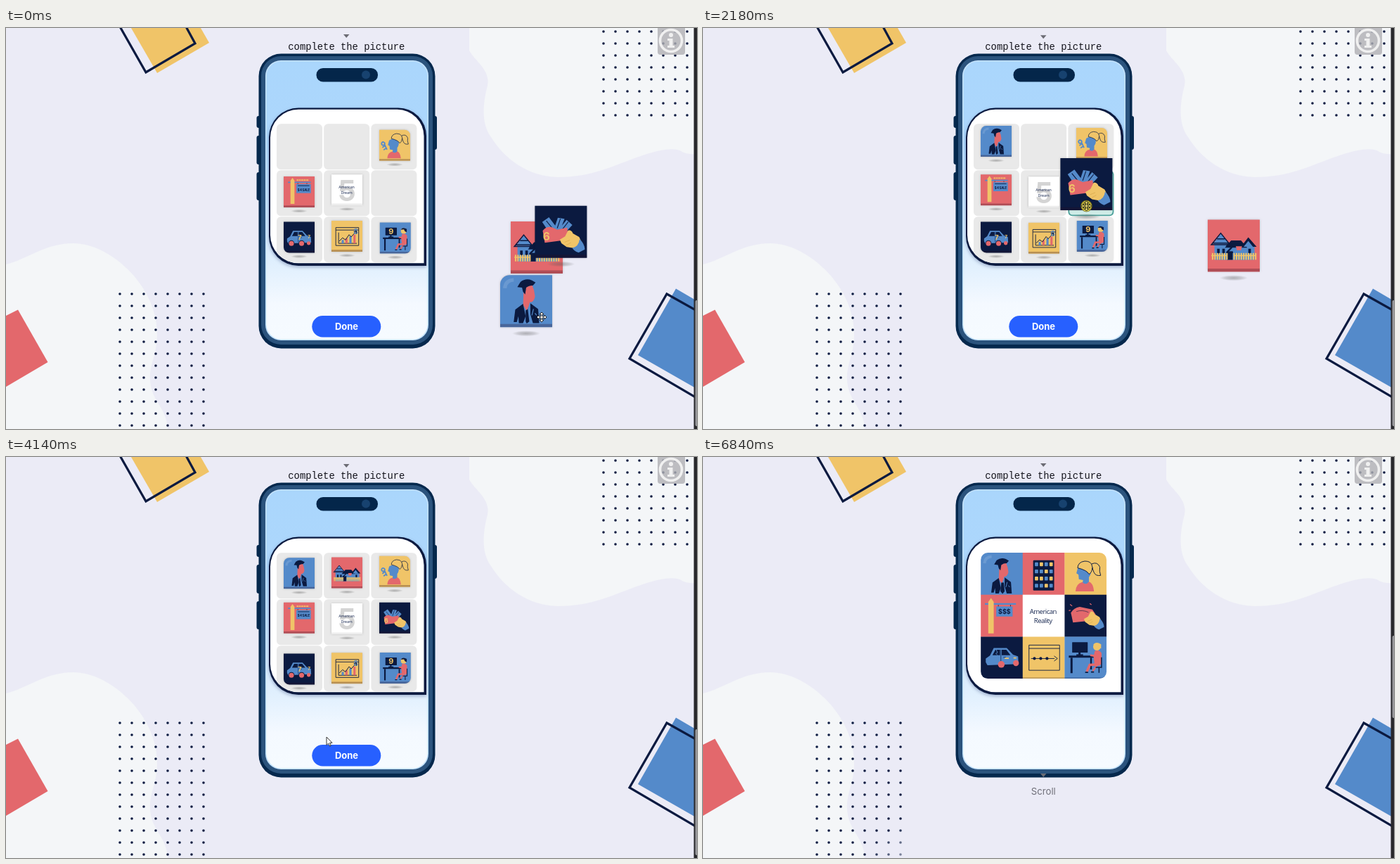
Animation, 983 px wide and 570 px high, one loop 6910 ms. Source, as an HTML page with a canvas:

```html
<!DOCTYPE html>
<html lang="en">
<head>
<meta charset="utf-8">
<title>Complete the picture</title>
<style>
html, body { margin: 0; width: 100%; height: 100%; overflow: hidden; background: #ebebf6; }
canvas { display: block; }
</style>
</head>
<body>
<canvas id="stage" width="983" height="570"></canvas>
<script>
const ctx = document.getElementById('stage').getContext('2d');
const LOOP = 6910;
const NAVY = '#0b1a40', BLUE = '#548aca', RED = '#e3686c', YELLOW = '#f0c468', WHITE = '#fff';

const clamp = v => Math.max(0, Math.min(1, v));
const lerp = (a, b, p) => a + (b - a) * p;
const smooth = p => p * p * (3 - 2 * p);
const ramp = (t, from, to) => clamp((t - from) / (to - from));

function fill(color, d) {
  ctx.fillStyle = color;
  ctx.fill(new Path2D(d));
}
function line(color, width, d) {
  ctx.strokeStyle = color;
  ctx.lineWidth = width;
  ctx.stroke(new Path2D(d));
}
function rect(color, x, y, w, h, r = 0) {
  ctx.beginPath();
  ctx.roundRect(x, y, w, h, r);
  ctx.fillStyle = color;
  ctx.fill();
}
function dot(color, x, y, r) {
  ctx.beginPath();
  ctx.arc(x, y, r, 0, Math.PI * 2);
  ctx.fillStyle = color;
  ctx.fill();
}
function text(str, x, y, font, color, spacing = 0) {
  ctx.font = font;
  ctx.fillStyle = color;
  ctx.textAlign = 'center';
  ctx.letterSpacing = spacing + 'px';
  ctx.fillText(str, x + spacing / 2, y);
  ctx.letterSpacing = '0px';
}
const bold = size => `700 ${size}px Inter, sans-serif`;

// Icons live in a 100 x 100 box; "real" picks the closing picture's version.
const icons = [
  real => {
    ctx.save();
    if (!real) ctx.translate(1, -5);
    fill(RED, 'M46 30L60 23L64 34L66 46Q64 57 56 57L54 64L50 74L43 62L44 38Z');
    fill(NAVY, 'M32 28L38 18Q48 10 60 15L67 19L62 25Q54 25 49 29L47 42L43 37L41 29Z');
    fill(NAVY, 'M25 95L28 71L43 60L48 84L43 97L35 97L34 84L31 95Z');
    fill(NAVY, 'M74 97L72 70L57 59L57 80L62 97Z');
    fill(NAVY, real ? 'M49 71L55 71L57 92L52 98L47 92Z' : 'M48 73L52 70L55 94L50 98L48 94Z');
    line(BLUE, 1.6, 'M63 70L60 82M66 78L69 82');
    ctx.restore();
    line('rgba(255,255,255,.13)', 7, 'M9 25Q10 10 26 9');
  },
  real => {
    if (real) {
      rect(NAVY, 25, 18, 50, 72, 2);
      ['bybY'.toLowerCase(), 'bbyb', 'yyby', 'bbyb'].forEach((row, j) =>
        [...row].forEach((c, i) => rect(c === 'y' ? YELLOW : BLUE, 29 + i * 11.6, 23 + j * 17, 8, 9, 1.5)));
      return;
    }
    rect(BLUE, 13, 47, 27, 30);
    rect(BLUE, 36, 47, 34, 30);
    rect(BLUE, 65, 50, 25, 27);
    fill(BLUE, 'M10 47L25 27L42 47Z');
    line(NAVY, 2, 'M7 48L25 26L43 48ZM10 45L40 45M18 37L33 37');
    fill(NAVY, 'M33 54L45 40L64 40L76 54ZM64 52L78 34L94 52Z');
    fill(BLUE, 'M69 52L78 41L87 52Z');
    fill(RED, 'M54 51L66 51L64 59L56 59Z');
    for (const x of [18, 28, 78]) rect(NAVY, x, 56, 5, 9);
    rect(NAVY, 37, 61, 11, 16);
    for (let x = 8; x < 92; x += 4.6) if (x < 36 || x > 49) rect(YELLOW, x, 64, 2.8, 13, 1);
    rect(YELLOW, 7, 68, 29, 2);
    rect(YELLOW, 50, 68, 42, 2);
    text('2', 42, 64, bold(25), NAVY);
  },
  real => {
    fill(BLUE, 'M32 34L28 49L33 52L34 63L44 65L42 75L58 75L58 58Q66 48 62 34Q46 24 32 34Z');
    const hair = 'M31 36Q32 22 48 20Q60 20 64 27Q78 20 84 34Q82 44 86 54Q74 56 70 47L66 36Q65 48 58 51Q54 42 31 36Z';
    ctx.save();
    if (!real) ctx.translate(8, -8);
    fill(YELLOW, hair);
    line(NAVY, 1.6, hair + 'M64 27L67 37');
    ctx.restore();
    fill(RED, 'M26 92Q27 74 42 70Q50 79 58 69Q68 72 70 92Z');
    if (!real) {
      line(BLUE, 4, 'M17 47a5 5 0 1 1 -9 -5a5 5 0 1 1 9 5L25 64M17 52L10 57M21 60L14 65');
    }
  },
  real => {
    ctx.save();
    if (!real) ctx.translate(4, -3);
    rect(BLUE, 10, 20, 74, 4);
    fill(YELLOW, 'M18 92L18 17L24.5 8L31 17L31 92Z');
    line(NAVY, 1.2, 'M42 24L42 29M71 24L71 29');
    rect(BLUE, 37, 28, real ? 39 : 47, real ? 24 : 29);
    if (real) text('$$$', 56.5, 45, bold(15), NAVY);
    else {
      line(YELLOW, 4, 'M38 15L76 15');
      line(RED, 1.5, 'M45 12L45 18M52 12L52 18M60 12L60 18M68 12L68 18');
      line(NAVY, 2, 'M42 33L79 33');
      text('$ 4 SALE', 60.5, 50, bold(10), NAVY, -.6);
    }
    ctx.restore();
  },
  real => {
    if (!real) text('5', 50, 85, bold(92), '#d4d4d4');
    const size = real ? 16 : 12.2, gap = real ? -.9 : -.45;
    const font = `500 ${size}px "Open Sans", "Noto Sans", sans-serif`;
    text('American', 49, real ? 46 : 46, font, '#172750', gap);
    text(real ? 'Reality' : 'Dream', 49, real ? 68 : 64, font, '#172750', gap);
  },
  real => {
    if (real) {
      line(RED, 2, 'M13 23L18 27M60 21L64 24M10 38L14 37');
      fill(RED, 'M15 43Q22 31 36 29L66 35L74 47L61 62L20 66Z');
      line(NAVY, 1, 'M28 40Q42 35 57 42');
    } else {
      fill(BLUE, 'M14 31L27 22L39 38L44 23L57 25L52 38L61 27L72 37L58 52L26 49Z');
      line(NAVY, 1.5, 'M22 29L35 45M49 25L43 43M64 31L53 45');
      fill(RED, 'M15 48Q22 39 32 41L43 46L62 42L65 65L19 71Z');
      text('6', 22, 66, bold(21), YELLOW);
    }
    ctx.save();
    if (real) ctx.translate(-2, -7);
    fill(YELLOW, 'M48 65L58 59L64 47Q71 46 73 53L85 60L91 72L78 82L61 79L51 72Z');
    line('#d7a74c', 1, 'M57 70L67 66M60 76L69 71');
    fill(BLUE, 'M86 64Q96 74 96 84L84 90Q74 86 72 81Q84 79 86 64Z');
    ctx.restore();
  },
  real => {
    ctx.save();
    if (!real) ctx.translate(-1, 2);
    fill(BLUE, 'M12 52L22 45L31 27L62 27L77 43L89 47L90 65L16 68L12 61Z');
    fill(NAVY, 'M28 44L35 31L46 31L46 44ZM50 31L61 31L71 44L50 44Z');
    line(NAVY, 1.2, 'M48 31L48 64M54 49L60 49');
    if (real) {
      dot(RED, 49, 66, 8);
      dot(RED, 84, 63, 7);
      line(BLUE, 1.5, 'M37 31L40 38L36 40L40 44');
      rect(YELLOW, 57, 50, 10, 3, 1);
      rect(YELLOW, 78, 49, 7, 3, 1);
    } else {
      for (const x of [26, 59]) {
        dot(NAVY, x, 68, 10);
        dot(RED, x, 68, 8);
      }
      dot(RED, 82, 67, 6);
      text('7', 53, 57, bold(21), YELLOW);
      text('7', 83, 52, bold(15), YELLOW);
    }
    ctx.restore();
  },
  real => {
    if (real) {
      line(NAVY, 1.5, 'M15 20H88V80H15ZM15 28H88M20 52H76M75 46L83 52L75 58');
      for (const x of [28, 43, 58]) dot(NAVY, x, 52, 3.5);
      return;
    }
    line(NAVY, 2, 'M14 22H88V80H14ZM14 30H88M23 38V73H82');
    [[33, 62, BLUE], [45, 57, RED], [58, 50, BLUE], [71, 45, RED]].forEach(([x, y, c]) => rect(c, x, y, 7, 73 - y));
    line(NAVY, 2.2, 'M25 66L36 55L45 62L57 45L64 52L80 34');
    text('8', 79, 43, bold(22), BLUE);
    line(NAVY, 2, 'M72 35L81 33L80 42');
  },
  real => {
    ctx.save();
    if (!real) ctx.translate(0, 3);
    rect(NAVY, 18, 13, 37, 25, 1);
    rect(NAVY, 33, 38, 5, 8);
    rect(NAVY, 10, 45, 70, 5);
    rect(NAVY, 14, 50, 5, 37);
    rect(NAVY, 61, 50, 4, 28);
    rect(NAVY, 28, 42, 16, 4);
    dot(YELLOW, 77, 24, 9);
    fill(real ? YELLOW : NAVY, 'M68 20Q74 10 87 18L87 28L81 25L78 19Z');
    fill(RED, 'M72 34Q82 30 88 39L88 66L72 70L69 48L61 46L61 42L70 43Z');
    line(RED, 6, 'M84 66L60 67L53 83');
    line(RED, 4, 'M78 67L67 82');
    line(NAVY, 3, 'M49 85L56 85M63 84L70 84');
    line(NAVY, 2.5, 'M88 49V73H74M82 73V86');
    if (!real) text('9', 36.5, 34, bold(25), YELLOW);
    ctx.restore();
  }
];

const faces = [BLUE, RED, YELLOW, RED, WHITE, NAVY, NAVY, YELLOW, BLUE];
const corners = { 0: [18, 0, 0, 0], 2: [0, 18, 0, 0], 6: [0, 0, 0, 18], 8: [0, 0, 18, 0] };
const crest = [120, 88, 0, 0, 250, 270, 130, 180, 85];  // bob phase in degrees
const restY = [141, 141, 142.4, 208.5, 209, 208.5, 277, 276.4, 276.4];
const restX = i => [395, 463, 531][i % 3] + (i > 6 && i === 8 ? .8 : 0);
const drags = {
  0: { x: 703, y: 352.5, grab: 90, drop: 840 },
  5: { x: 752.4, y: 252.7, grab: 1540, drop: 2240 },
  1: { x: 718, y: 274.8, grab: 2740, drop: 3440 }
};
const path = [
  [0, 762, 411], [90, 762, 411], [800, 424, 205], [880, 424, 205], [1490, 790, 331],
  [1540, 789.5, 323], [2180, 545.5, 253], [2260, 543, 251], [2700, 751, 339], [2740, 751, 339],
  [3380, 477.5, 205], [3460, 477, 205], [4140, 456, 398], [4400, 478, 431], [4600, 478, 431],
  [5100, 479, 440], [5900, 479, 441], [6600, 358, 543]
];

function pointer(t) {
  const n = path.findIndex(k => k[0] > t);
  if (n < 0) return path[path.length - 1].slice(1);
  const a = path[n - 1], b = path[n], p = smooth((t - a[0]) / (b[0] - a[0]));
  return [lerp(a[1], b[1], p), lerp(a[2], b[2], p)];
}

function place(i, t) {
  const bob = 2.4 * Math.cos((t / 3000 * 360 - crest[i]) * Math.PI / 180);
  const slot = { x: restX(i), y: restY[i] + bob, size: 44 };
  const d = drags[i];
  if (!d) return slot;
  const from = pointer(d.grab), at = pointer(Math.max(d.grab, Math.min(t, d.drop)));
  const free = { x: d.x + at[0] - from[0], y: d.y + at[1] - from[1] + bob, size: 74 };
  const p = smooth(ramp(t, d.drop, d.drop + 110));
  return { x: lerp(free.x, slot.x, p), y: lerp(free.y, slot.y, p), size: lerp(74, 44, p) };
}

function tile(i, t) {
  const { x, y, size } = place(i, t);
  ctx.save();
  ctx.translate(x, y);
  ctx.scale(size / 100, size / 100);
  ctx.save();
  ctx.translate(50, 112);
  ctx.scale(1, .2);
  const g = ctx.createRadialGradient(0, 0, 0, 0, 0, 27);
  g.addColorStop(0, 'rgba(90,90,90,.42)');
  g.addColorStop(.6, 'rgba(90,90,90,.22)');
  g.addColorStop(1, 'rgba(90,90,90,0)');
  dot(g, 0, 0, 27);
  ctx.restore();
  ctx.shadowColor = 'rgba(0,0,0,.22)';
  ctx.shadowBlur = 3;
  rect(faces[i], 0, 0, 100, 100, corners[i]);
  ctx.shadowColor = 'transparent';
  ctx.beginPath();
  ctx.roundRect(0, 0, 100, 100, corners[i]);
  ctx.clip();
  icons[i](false);
  rect(i === 4 ? 'rgba(0,0,0,.07)' : 'rgba(40,10,30,.28)', 0, 94, 100, 6);
  ctx.restore();
}

function dots(x0, y0, rows) {
  for (let j = 0; j < rows; j++)
    for (let i = 0; i < 8; i++) dot(NAVY, x0 + i * 17, y0 + j * 17, 1.8);
}

function backdrop() {
  rect('#ebebf6', 0, 0, 983, 570);
  const pale = '#f4f6f8';
  fill(pale, 'M659 0V32C666 46 690 60 685 82C679 104 675 135 690 155C708 185 742 211 785 212C835 212 865 195 900 183C925 174 952 168 962 176Q970 180 983 179V0Z');
  fill(pale, 'M0 336C30 329 55 306 96 306C145 306 212 362 215 430C216 465 204 475 205 500C206 530 229 540 230 570H0Z');
  fill(YELLOW, 'M178 0L215 64L289 21L277 0Z');
  line(NAVY, 3.2, 'M162 -2L199 63L269 22L256 -2');
  fill(RED, 'M0 409L17 400.5L59.5 475L0 510Z');
  fill(BLUE, 'M953 370.5L983 388V513L899 465Z');
  line(NAVY, 3.2, 'M983 402L940 378L887 470L983 526');
  dots(162, 378, 12);
  dots(850, 5, 8);
  rect('rgba(176,176,180,.8)', 927, -4, 39, 42, 4);
  ctx.beginPath();
  ctx.arc(946, 18, 15.5, 0, 7);
  ctx.strokeStyle = '#f0f0f0';
  ctx.lineWidth = 3.6;
  ctx.stroke();
  dot('#f0f0f0', 946, 10, 3);
  fill('#f0f0f0', 'M941 15H948.5V25H951V28H941V25H943.5V18H941Z');
}

function phone() {
  const dark = '#05284d';
  for (const [y, h] of [[125, 17], [153, 41], [205, 40]]) rect(dark, 356.5, y, 8, h, 3);
  rect(dark, 605, 125, 8, 48, 3);
  rect(dark, 359.5, 36.5, 251, 419, 32);
  rect('#2b537d', 363, 40, 244, 410, 28);
  rect('#c3e2fd', 369, 46, 232, 398, 22);
  const g = ctx.createLinearGradient(0, 46, 0, 444);
  g.addColorStop(0, '#aad6fc');
  g.addColorStop(.3, '#add7fc');
  g.addColorStop(.75, '#e3f1fe');
  g.addColorStop(.87, '#f4f9ff');
  g.addColorStop(1, '#f6fbff');
  rect(g, 370.5, 47.5, 229, 395, 21);
  rect('#04264a', 441.5, 57, 87.5, 19.5, 9.5);
  dot('#17426f', 512, 66.5, 6);
}

function board(t) {
  ctx.save();
  ctx.shadowColor = 'rgba(30,50,110,.35)';
  ctx.shadowBlur = 5;
  ctx.shadowOffsetY = 2;
  rect(NAVY, 374, 113.5, 224, 224.5, [42, 40, 0, 42]);
  ctx.restore();
  rect(WHITE, 376, 115.8, 218.5, 218.5, [40, 38, 0, 40]);

  const alpha = 1 - ramp(t, 4600, 4900);
  if (alpha > 0) {
    ctx.save();
    ctx.globalAlpha = alpha;
    ctx.beginPath();
    ctx.roundRect(376, 115.8, 218.5, 218.5, [40, 38, 0, 40]);
    ctx.clip();
    for (let i = 0; i < 9; i++) {
      const x = 385 + i % 3 * 67.2, y = 136.3 + Math.floor(i / 3) * 66, d = drags[i];
      rect('#e9e9e9', x, y, 65, 65, 6);
      if (!d || t < d.grab || t > d.drop) continue;
      const p = place(i, t), cx = p.x + 37, cy = p.y + 37;
      if (cx < x || cx > x + 65 || cy < y || cy > y + 65) continue;
      rect('#4fa39d', x, y, 65, 65, 6);
      rect('#cfece7', x + 1.8, y + 1.8, 61.4, 61.4, 4.5);
    }
    ctx.restore();
  }
}

function closing(t) {
  const p = ramp(t, 4950, 5650);
  if (!p) return;
  const e = 1 - (1 - p) ** 2, size = 179 * lerp(.9, 1, e);
  ctx.save();
  ctx.globalAlpha = e;
  ctx.translate(484.6 - size / 2, 225.6 - size / 2);
  ctx.scale(size / 300, size / 300);
  ctx.beginPath();
  ctx.roundRect(0, 0, 300, 300, 17);
  ctx.clip();
  for (let i = 0; i < 9; i++) {
    ctx.save();
    ctx.translate(i % 3 * 100, Math.floor(i / 3) * 100);
    rect(faces[i], 0, 0, 100.4, 100.4);
    icons[i](true);
    ctx.restore();
  }
  rect('rgba(20,20,60,.22)', 0, 297, 300, 3);
  ctx.restore();
}

function triangle(y) {
  fill('#6c6c74', `M480 ${y - 2.4}H488.5L484.2 ${y + 2.6}Z`);
}

function controls(t) {
  const nod = -1.3 * Math.cos((t / 1000 * 360 - 330) * Math.PI / 180);
  triangle(12.5 + nod);
  text('complete the picture', 484.3, 30.5, '13.83px "Liberation Mono", monospace', '#14141c');

  const out = 1 - ramp(t, 4540, 4720);
  if (out > 0) {
    ctx.globalAlpha = out;
    rect('#2760ff', 435.3, 409, 98, 30.5, 15.25);
    text('Done', 484.5, 429, bold(13), WHITE);
  }
  const shown = ramp(t, 4720, 5100);
  ctx.globalAlpha = shown;
  if (shown > 0) {
    ctx.save();
    ctx.translate(485, 570);
    ctx.scale(1, 80 / 255);
    const g = ctx.createRadialGradient(0, 0, 0, 0, 0, 255);
    g.addColorStop(0, 'rgba(235,235,246,1)');
    g.addColorStop(.7, 'rgba(235,235,246,.75)');
    g.addColorStop(1, 'rgba(235,235,246,0)');
    dot(g, 0, 0, 255);
    ctx.restore();
    triangle(453.6 + nod);
    text('Scroll', 484.3, 479.5, '13.2px Inter, sans-serif', '#70707a');
  }
  ctx.globalAlpha = 1;

  rect('#28282b', 978.5, 0, 4.5, 570);
  const p = smooth(ramp(t, 4600, 4760)), drift = ramp(t, 5330, 6840);
  const top = lerp(387, 250, p) + 4 * drift, end = lerp(566, 370, p) + drift;
  rect('#98989b', 980.5, top, 5, end - top, 2);
}

function cursor(t) {
  if (t > 6640) return;
  const [x, y] = pointer(t);
  const pressed = Object.values(drags).some(d => t >= d.grab && t < d.drop);
  const over = t < 4600 && faces.some((_, i) => {
    const p = place(i, t);
    return x >= p.x && x <= p.x + p.size && y >= p.y && y <= p.y + p.size + 3;
  });
  ctx.save();
  ctx.translate(x, y);
  if (pressed || (t > 4480 && t < 4580)) {
    dot('rgba(240,220,50,.75)', 0, 0, 8);
    ctx.strokeStyle = 'rgba(70,60,10,.6)';
    ctx.lineWidth = 1;
    ctx.stroke();
  }
  if (pressed || over) {
    const arm = 'M0 -7L3 -4H1V-1H4V-3L7 0L4 3V1H1V4H3L0 7L-3 4H-1V1H-4V3L-7 0L-4 -3V-1H-1V-4H-3Z';
    fill(pressed ? '#f4e36a' : WHITE, arm);
    line('#222', 1, arm);
  } else {
    const arrow = 'M0 0V11.5L2.7 9L4.5 13L6.3 12.2L4.6 8.3H8Z';
    fill(WHITE, arrow);
    line('#333', 1, arrow);
  }
  ctx.restore();
}

function draw(t) {
  backdrop();
  phone();
  board(t);
  const fade = 1 - ramp(t, 4600, 4900);
  if (fade > 0) {
    ctx.globalAlpha = fade;
    const held = [0, 5, 1].find(i => t >= drags[i].grab && t < drags[i].drop + 110);
    const order = [2, 3, 4, 6, 7, 8, 1, 5, 0].filter(i => i !== held);
    if (held !== undefined) order.push(held);
    order.forEach(i => tile(i, t));
    ctx.globalAlpha = 1;
  }
  closing(t);
  controls(t);
  cursor(t);
}

const start = performance.now();
function tick() {
  draw((performance.now() - start) % LOOP);
  requestAnimationFrame(tick);
}
tick();
</script>
</body>
</html>
```
